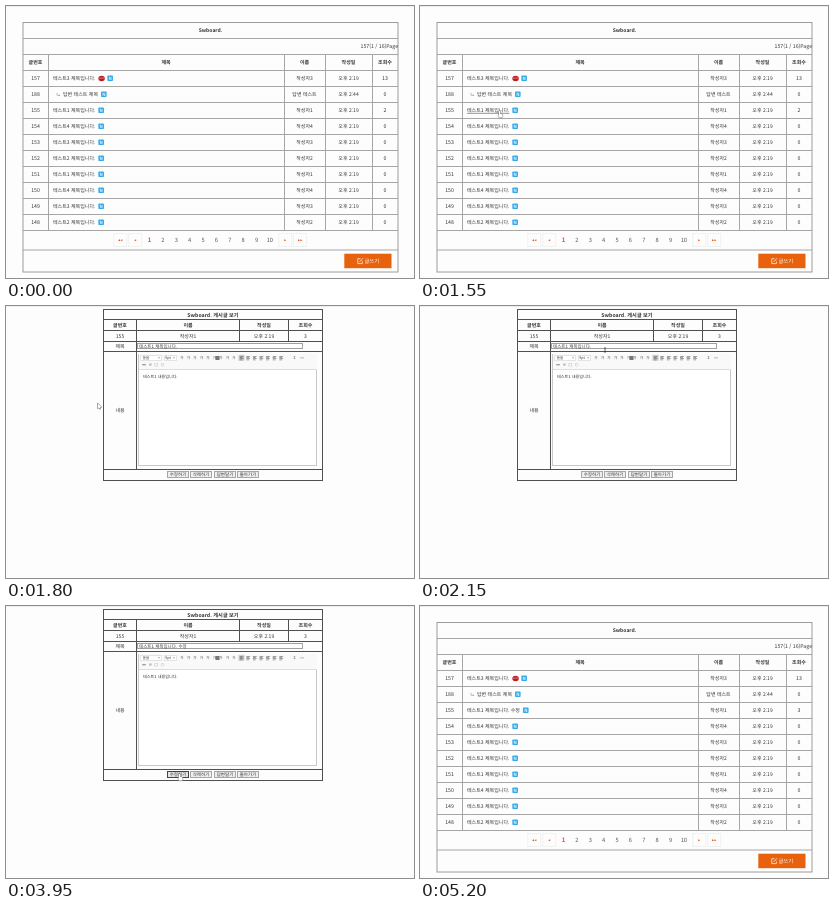
Recreate the animation shown at these times as an HTML page with a canvas. Size 408 by 272 pixels, loop 5650 ms.

```html
<!DOCTYPE html>
<html lang="ko">
<head>
<meta charset="utf-8">
<style>
html, body { margin: 0; width: 100%; height: 100%; overflow: hidden; background: #fdfdfd; }
canvas { display: block; }
</style>
</head>
<body>
<canvas id="stage" width="408" height="272"></canvas>
<script>
const ctx = document.getElementById('stage').getContext('2d');
const LOOP = 5650, TICK = 50;
const OPEN_VIEW = 1700, LOAD_EDITOR = 1800, SAVE = 3900, BACK_TO_LIST = 4050;
const FONT = '"Noto Sans CJK KR", "Noto Sans KR", "Noto Sans CJK", "Noto Sans", sans-serif';
const INK = '#333', ORANGE = '#e8610c';

// Where the pointer rests on its way.
const spot = {
  write: [359, 238], lower: [310, 195], link: [78, 105], field: [184, 41], above: [207, 10],
  typing: [174, 46], save: [172, 168], middle: [156, 139], title: [108, 108], button: [373, 250]
};
// Each glide holds its end point until the next one begins.
const glides = [
  { start: 800, end: 850, from: spot.write, to: spot.write },
  { start: 850 },
  { start: 1050, end: 1550, from: spot.lower, to: spot.link },
  { start: 1750, end: 2150, from: spot.link, to: spot.field },
  { start: 2200, end: 2350, from: spot.above, to: spot.typing },
  { start: 2400 },
  { start: 3050, end: 3450, from: spot.field, to: spot.save },
  { start: 4200, end: 4400, from: spot.save, to: spot.middle },
  { start: 4400, end: 4600, from: spot.middle, to: spot.title },
  { start: 4700, end: 5150, from: spot.title, to: spot.button },
  { start: 5200 }
];

function pointerAt(t) {
  const glide = glides.findLast(g => t >= g.start);
  if (!glide?.to) return null;
  const u = Math.min(1, (t - glide.start) / (glide.end - glide.start));
  const [x, y] = glide.from.map((a, i) => a + (glide.to[i] - a) * u);
  return { x, y };
}

const inside = (p, x, y, w, h) => p && p.x >= x && p.x <= x + w && p.y >= y && p.y <= y + h;
const centers = edges => edges.slice(1).map((x, i) => (x + edges[i]) / 2);

function text(str, x, y, { size = 5, align = 'center', weight = 400, color = INK } = {}) {
  ctx.font = `${weight} ${size}px ${FONT}`;
  ctx.textRendering = 'geometricPrecision';
  ctx.textAlign = align;
  ctx.fillStyle = color;
  ctx.fillText(str, x, y + size * 0.36);
  return ctx.measureText(str).width;
}

function rect(x, y, w, h, color) {
  ctx.fillStyle = color;
  ctx.fillRect(x, y, w, h);
}

function frameBox(x, y, w, h, stroke, fill) {
  if (fill) rect(x, y, w, h, fill);
  ctx.strokeStyle = stroke;
  ctx.lineWidth = 1;
  ctx.strokeRect(x, y, w, h);
}

function stroke(color, width, ...points) {
  ctx.beginPath();
  points.forEach(([x, y]) => ctx.lineTo(x, y));
  ctx.strokeStyle = color;
  ctx.lineWidth = width;
  ctx.stroke();
}

const hLine = (x0, x1, y, color) => stroke(color, 1, [x0, y], [x1, y]);
const vLine = (x, y0, y1, color) => stroke(color, 1, [x, y0], [x, y1]);

function triangle(x, y, dx, dy, color) {
  ctx.beginPath();
  ctx.moveTo(x + dx, y + dy);
  ctx.lineTo(x - dx - dy, y - dy - dx);
  ctx.lineTo(x - dx + dy, y - dy + dx);
  ctx.fillStyle = color;
  ctx.fill();
}

function newBadge(x, y) {
  ctx.beginPath();
  ctx.roundRect(x - 2.8, y - 2.8, 5.6, 5.6, 0.8);
  ctx.fillStyle = '#35aae5';
  ctx.fill();
  text('N', x, y, { size: 4.4, weight: 700, color: '#e4f4fc' });
}

function hotBadge(x, y) {
  ctx.beginPath();
  ctx.ellipse(x, y + 0.2, 3.2, 2.8, 0, 0, Math.PI * 2);
  ctx.fillStyle = '#bd1c22';
  ctx.fill();
  text('HOT', x, y + 0.2, { size: 2.2, color: '#fff' });
}

function replyMark(x, y) {
  stroke('#999', 0.6, [x, y - 1.5], [x, y + 1], [x + 3, y + 1]);
  triangle(x + 2.6, y + 1, 0.8, 0, '#999');
}

function writeButton() {
  rect(338.3, 247.7, 47.2, 14.5, ORANGE);
  stroke('#fff', 0.7, [354.5, 252.7], [351.8, 252.7], [351.8, 257.6], [356.4, 257.6], [356.4, 255.3]);
  stroke('#fff', 0.8, [353.7, 255.8], [357, 252.3]);
  text('글쓰기', 365.7, 255, { size: 5.3, weight: 500, color: '#fff' });
}

function pagination(y) {
  for (const dir of [-1, 1]) {
    for (const count of [1, 2]) {
      const x = 204.2 + dir * (60 + 15 * count);
      frameBox(x - 6.5, y - 6.5, 13, 13, '#f1f1f1');
      for (let i = 0; i < count; i++) {
        triangle(x + (i - (count - 1) / 2) * 2.4, y + 0.2, dir, 0, '#e2540f');
      }
    }
  }
  for (let n = 1; n <= 10; n++) {
    const current = n === 1;
    text(n, 143.5 + (n - 1) * 13.37, y, {
      size: current ? 6 : 5.7, weight: current ? 700 : 400, color: current ? '#e2540f' : '#555'
    });
  }
}

function listRow(i, columns, edited, pointer) {
  const y = 72.3 + i * 16, id = 157 - i;
  const reply = i === 1, opened = i === 2;
  const author = (id + 1) % 4 + (id % 4 === 3 ? 1 : 0) || 1;
  const n = (id - 147) % 4 + 1;
  const title = (reply ? '답변 테스트 제목' : `테스트${n} 제목입니다.`) + (opened && edited ? ' 수정' : '');
  const hits = i === 0 ? 13 : opened ? (edited ? 3 : 2) : 0;
  const x = reply ? 57 : 47;
  const width = text(title, x, y, { align: 'left' });
  let badgeX = x + width + 5.8;

  if (inside(pointer, 47, y - 4, 42, 8)) rect(x, y + 2.6, width, 0.6, '#555');
  if (reply) replyMark(51, y);
  if (i === 0) {
    hotBadge(badgeX + 0.4, y);
    badgeX += 9;
  }
  newBadge(badgeX, y);
  text(reply ? 188 : id, columns[0], y, { size: 5.2 });
  text(reply ? '답변 테스트' : `작성자${n}`, columns[2], y);
  text(reply ? '오후 2:44' : '오후 2:19', columns[3], y);
  text(hits, columns[4], y, { size: 5.2 });
}

function drawList(edited, pointer) {
  const line = '#a6a6a6', edges = [17, 42, 278, 319, 366, 392], columns = centers(edges);
  for (let y = 32; y <= 224; y += 16) hLine(17, 392, y + 0.5, line);
  hLine(17, 392, 244, line);
  edges.slice(1, -1).forEach(x => vLine(x + 0.5, 48, 224, line));
  frameBox(17, 16.5, 375, 249.5, '#9c9c9c');

  text('Swboard.', 204.5, 24.3, { weight: 700 });
  text('157(1 / 16)Page', 392, 40.5, { size: 5.2, align: 'right' });
  ['글번호', '제목', '이름', '작성일', '조회수'].forEach((s, i) =>
    text(s, columns[i], 56.5, { weight: 700 }));
  for (let i = 0; i < 10; i++) listRow(i, columns, edited, pointer);
  pagination(234);
  writeButton();
}

function toolbar(x, y) {
  const glyph = (s, gx, gy = y + 3.8) => text(s, gx, gy, { size: 3.6 });
  rect(x, y, 178, 15, '#f9f9f9');
  hLine(x, x + 178, y + 15.5, '#ddd');
  frameBox(x + 1.5, y + 1.5, 21, 5, '#e4e4e4', '#fff');
  frameBox(x + 25.5, y + 1.5, 12, 5, '#e4e4e4', '#fff');
  glyph('돋움', x + 7);
  glyph('9pt', x + 29);
  for (const dx of [20, 35]) triangle(x + dx, y + 4, 0, 0.8, '#777');
  for (let i = 0; i < 9; i++) glyph('가', x + 43 + i * 6.5);
  rect(x + 76.5, y + 2, 4, 4, '#777');
  rect(x + 99.5, y + 0.8, 6, 6, '#cfcfcf');
  for (let i = 0; i < 7; i++) {
    for (let k = 0; k < 4; k++) rect(x + 100.7 + i * 6.6, y + 2 + k * 1.2, 3.8 - k % 2, 0.6, '#666');
  }
  glyph('Σ', x + 155.5);
  glyph('•••', x + 163);
  [...'∞※□○'].forEach((s, i) => glyph(s, x + 5 + i * 6.2, y + 10.3));
}

// Each syllable is composed one key per tick.
function typedSuffix(t) {
  const compose = (keys, start) => keys[Math.min(keys.length - 1, Math.floor((t - start) / TICK))] ?? '';
  return ' ' + compose(['ㅅ', '수'], 2550) + compose(['ㅈ', '저', '정'], 2750);
}

function drawView(t, pointer) {
  const line = '#505050', editor = t >= LOAD_EDITOR, shift = editor ? 17 : 0;
  const edges = [97.5, 130.5, 233.5, 282.5, 316.5], columns = centers(edges);
  const bottom = 146.5 + shift;
  for (const y of [13.5, 24.5, 35.5, 45.5, bottom]) hLine(97, 317, y, line);
  edges.slice(1, -1).forEach((x, i) => vLine(x, 13, i ? 35 : bottom, line));
  frameBox(97.5, 3.5, 219, bottom + 7.5, line);

  text('Swboard. 게시글 보기', 207, 8.7, { size: 5.2, weight: 700 });
  ['글번호', '이름', '작성일', '조회수'].forEach((s, i) =>
    text(s, columns[i], 19.2, { weight: 700 }));
  ['155', '작성자1', '오후 2:19', '3'].forEach((s, i) => text(s, columns[i], 30));
  text('제목', 114, 40.5);
  text('내용', 114, 95.5 + shift / 2);

  frameBox(131.5, 37.5, 165, 5, '#a0a0a0', '#fff');
  text('테스트1 제목입니다.' + typedSuffix(t), 133, 40.2, { size: 4.5, align: 'left' });
  if (t >= 3150 && t < 3650) vLine(180.5, 38, 43, INK);

  if (editor) {
    frameBox(132.5, 48.5, 178, 111, '#c8c8c8', '#fff');
    toolbar(133, 48);
    text('테스트1 내용입니다.', 137, 71, { size: 4.1, align: 'left' });
  } else {
    frameBox(132.5, 47.5, 116, 95, '#a0a0a0', '#fff');
    text('테스트1 내용입니다.', 133.5, 50.5, { size: 4.8, align: 'left' });
  }

  ['수정하기', '삭제하기', '답변달기', '돌아가기'].forEach((s, i) => {
    const x = Math.round(161 + i * 23.4) + 0.5, y = 148.5 + shift;
    const hot = inside(pointer, x, y, 21, 6);
    frameBox(x, y, 21, 6, hot && t >= SAVE ? '#444' : hot ? '#777' : '#a6a6a6', hot ? '#e5e5e5' : '#efefef');
    text(s, x + 10.5, y + 3.2, { size: 4.5 });
  });
}

function drawPointer({ x, y }, kind) {
  ctx.beginPath();
  if (kind === 'beam') {
    rect(x + 0.6, y, 0.8, 6, INK);
    return;
  }
  if (kind === 'hand') {
    ctx.roundRect(x + 1, y, 1.4, 4, 0.6);
    ctx.roundRect(x + 0.4, y + 3, 4.2, 3.6, 1.2);
  } else {
    for (const [dx, dy] of [[0.4, 0.4], [0.4, 5.4], [1.8, 4.6], [2.8, 6.3], [2.7, 4.2], [4.2, 4]]) {
      ctx.lineTo(x + dx, y + dy);
    }
    ctx.closePath();
  }
  ctx.strokeStyle = '#666';
  ctx.lineWidth = 1;
  ctx.stroke();
  ctx.fillStyle = '#fff';
  ctx.fill();
}

function pointerKind(t, p, viewing) {
  if (!viewing) return inside(p, 47, 99, 42, 10) ? 'hand' : 'arrow';
  if (t < LOAD_EDITOR || inside(p, 161, 165, 92, 6)) return 'hand';
  return inside(p, 131, 34, 166, 9) ? 'beam' : 'arrow';
}

function draw(now) {
  const t = Math.floor((now % LOOP) / TICK) * TICK;
  const viewing = t >= OPEN_VIEW && t < BACK_TO_LIST;
  const pointer = pointerAt(t);
  rect(0, 0, 408, 272, '#fdfdfd');
  rect(0, 0, 408, 1, '#ececec');
  if (viewing) drawView(t, pointer);
  else drawList(t >= BACK_TO_LIST, pointer);
  if (pointer) drawPointer(pointer, pointerKind(t, pointer, viewing));
}

const start = performance.now();
function frame() {
  draw(performance.now() - start);
  requestAnimationFrame(frame);
}
frame();
</script>
</body>
</html>
```
